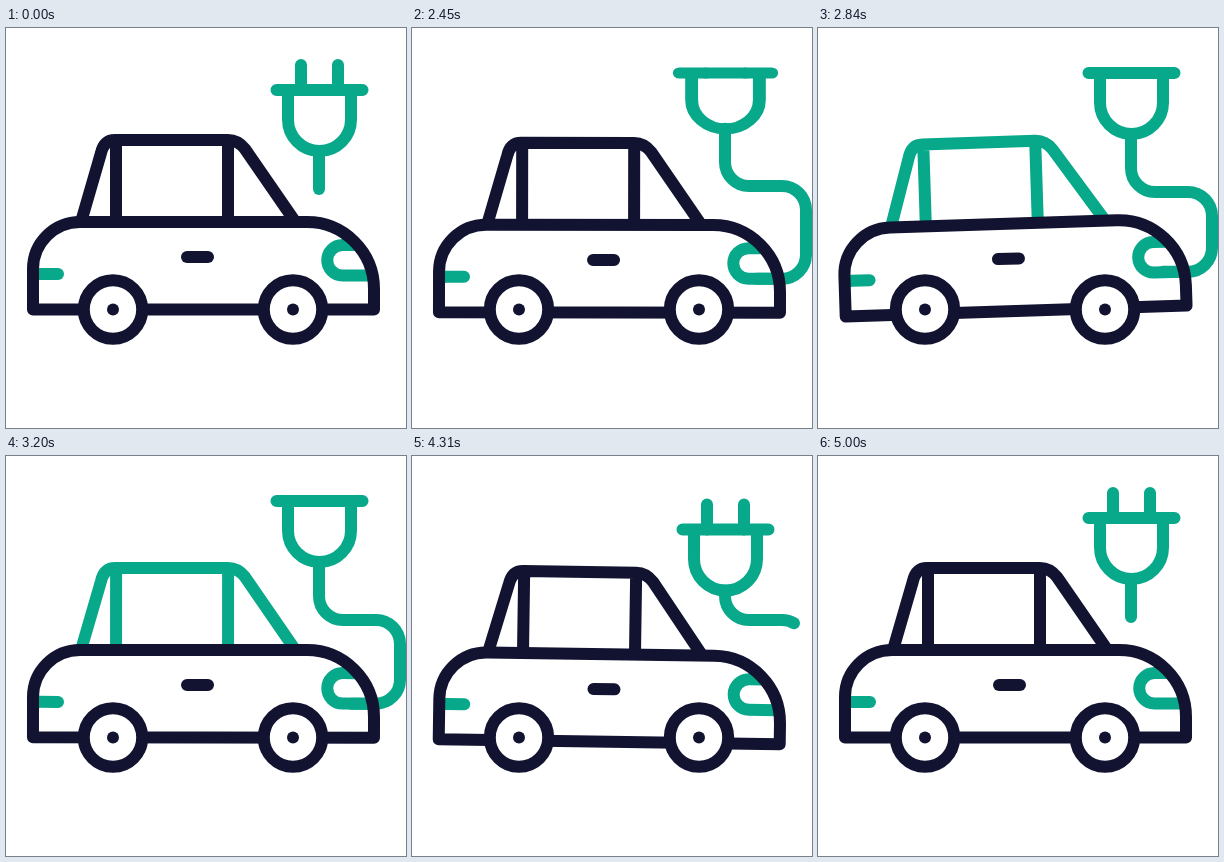
An HTML page that plays this animation: 400 by 400 pixels, repeating every 5.03 s.

```html
<!DOCTYPE html>
<html lang="en">
<head>
<meta charset="utf-8">
<title>Electric car</title>
<style>
  html, body { margin: 0; height: 100%; overflow: hidden; background: #fff; }
  svg { display: block; width: 100vw; height: 100vh; fill: none; stroke-width: 12; stroke-linejoin: round; }
  .navy { stroke: #121331; }
  .green { stroke: #08a88a; }
  .round { stroke-linecap: round; }
  .wheel { fill: #fff; }
  .hub { fill: #121331; stroke: none; }
</style>
</head>
<body>
<svg viewBox="0 0 400 400">
  <path id="cable" class="green round"/>
  <g id="plug" class="green round">
    <path id="prongs"/>
    <path d="M270.5 0H356.5M282 0V29.5A31.5 31.5 0 0 0 345 29.5V0"/>
  </g>
  <g id="car" class="navy">
    <path class="green" d="M350 217H336.5A15.2 15.2 0 0 0 336.5 247.5H364M30 246H34"/>
    <path class="green round" d="M34 246H52"/>
    <path id="roof" d="M75 194L95 125Q98 112 109 112H222Q232 112 239 121L288 192M110 112V194M222 112V194"/>
    <path d="M27 281.5V241A47 47 0 0 1 74 194H301A67 67 0 0 1 368 261V281.5Z"/>
    <path class="round" d="M181 229H202"/>
  </g>
  <g class="navy">
    <circle class="wheel" cx="107" cy="281.5" r="29.2"/>
    <circle class="wheel" cx="287" cy="281.5" r="29.2"/>
    <circle class="hub" cx="107" cy="281.5" r="6"/>
    <circle class="hub" cx="287" cy="281.5" r="6"/>
  </g>
</svg>
<script>
const LOOP = 5030;
const PLUG_IN = 2000, PLUG_OUT = 4160;
const IMPACT = 2420, RELEASE = 4190, SWING = 790;
const PLUG_X = 313.5, CABLE_X = 313, BOWL = 61, BEND = 24;
const NAVY = [18, 19, 49], GREEN = [8, 168, 138];
const { sin, exp, PI } = Math;
const $ = id => document.getElementById(id);

const progress = (t, from, to) => Math.min(1, Math.max(0, (t - from) / (to - from)));
const mix = (a, b, u) => a + (b - a) * u;
const ease = (t, from, to) => {
  const u = progress(t, from, to);
  return u * u * (3 - 2 * u);
};

// Downward tug that starts fast and relaxes slowly.
const tug = (t, from, length) => 11.5 * sin(PI * progress(t, from, from + length) ** .7);

// The car body bounces quickly while it rocks slowly.
function swing(t) {
  const start = t < RELEASE ? IMPACT : RELEASE;
  const u = progress(t, start, start + SWING);
  return {
    carY: 6.2 * (1 - u) ** 1.5 * sin(13.5 * u),
    tilt: 1.85 * sin(PI * u) * sin(2 * PI * u / .72)
  };
}

function draw(t) {
  const plugged = ease(t, PLUG_IN + 90, PLUG_IN + 340) - ease(t, PLUG_OUT, PLUG_OUT + 130);
  const pull = tug(t, PLUG_IN, 330) + tug(t, PLUG_OUT, 400);
  const barY = mix(62, 45, plugged) + pull;
  const squash = sin(PI * progress(t, 2360, 2540));
  const sx = 1 + .075 * squash, sy = 1 - .085 * squash;
  $('plug').setAttribute('transform',
    `translate(${PLUG_X} ${barY}) scale(${sx} ${sy}) translate(${-PLUG_X} 0)`);
  const prong = 25 * (1 - plugged);
  $('prongs').setAttribute('d', `M295 0V${-prong}M332 0V${-prong}`);

  const { carY, tilt } = swing(t);
  $('car').setAttribute('transform', `translate(0 ${carY}) rotate(${tilt} 197 262)`);
  const charge = ease(t, 2480, 2630) - ease(t, PLUG_OUT, PLUG_OUT + 110);
  $('roof').style.stroke = `rgb(${NAVY.map((c, i) => Math.round(mix(c, GREEN[i], charge)))})`;

  const top = barY + BOWL * sy;
  const slack = ease(t, 2040, 2250) - ease(t, 4320, 4650);
  const bendY = mix(185, 164, slack) - 6 * squash;
  const lightY = 247.5 + carY + 168 * tilt * PI / 180;
  const arc = `A${BEND} ${BEND} 0 0 `;
  $('cable').setAttribute('d',
    `M${CABLE_X} ${top}V${bendY - BEND}${arc}0 ${CABLE_X + BEND} ${bendY}H370` +
    `${arc}1 394 ${bendY + BEND}V${lightY - BEND}${arc}1 370 ${lightY}H345`);
  const reach = ease(t, 2060, 2400) * exp(-Math.max(0, t - PLUG_OUT) / 110);
  $('cable').style.strokeDasharray = `${38 + 222 * reach - pull / 2} 999`;
}

const start = performance.now();
function frame() {
  draw((performance.now() - start) % LOOP);
  requestAnimationFrame(frame);
}
frame();
</script>
</body>
</html>
```
